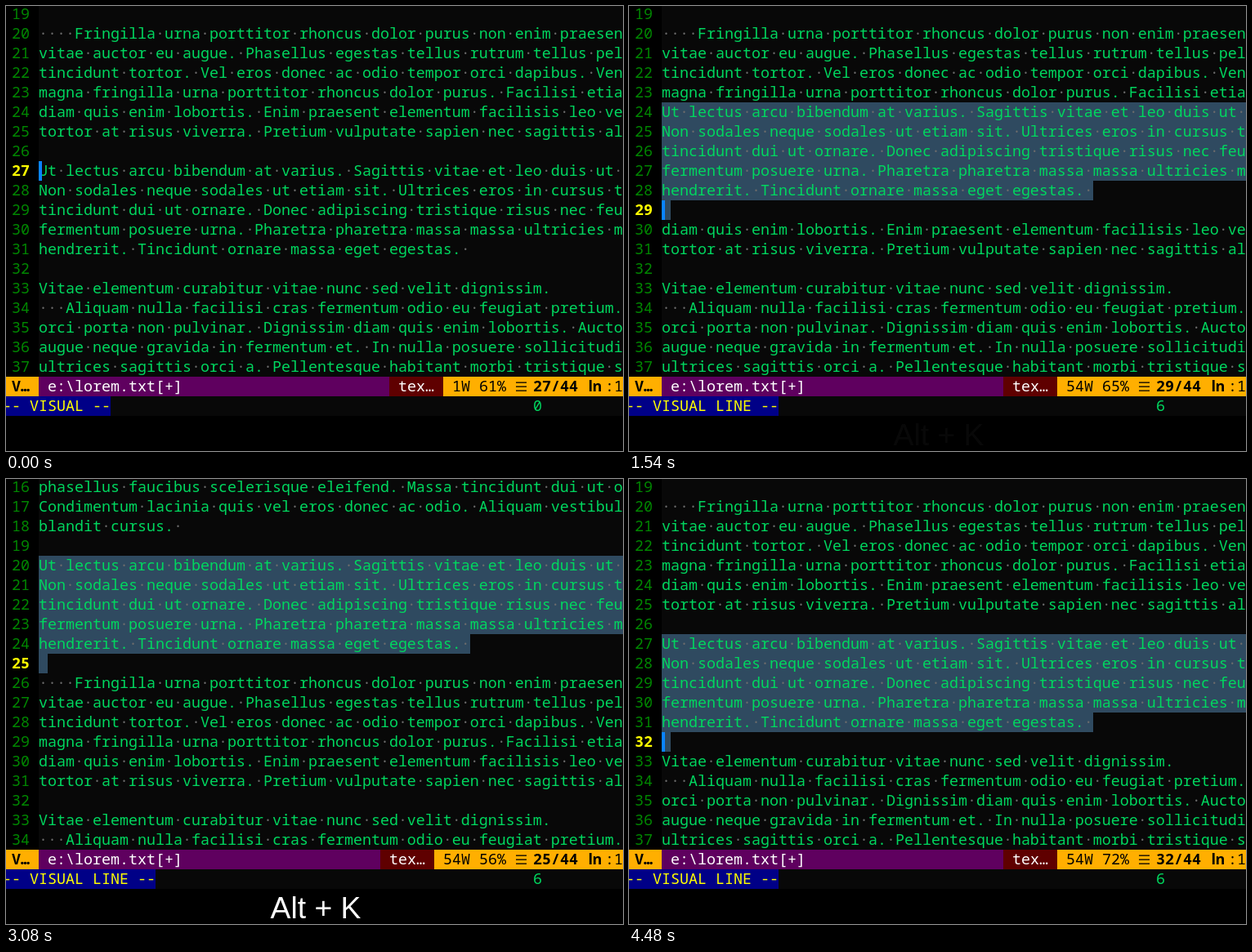
These frames come from a looping animation (755 by 545 pixels, 4.54 s). An HTML page:

```html
<!DOCTYPE html>
<html lang="en">
<head>
<meta charset="utf-8">
<title>Moving a block of lines</title>
<style>
html, body { margin: 0; width: 100%; height: 100%; overflow: hidden; background: #000; }
svg { display: block; width: 755px; height: 545px; }
text { font: 18.3333px "Noto Sans Mono", monospace; white-space: pre; }
.bold { font-weight: 700; }
.key { font: 37.3px "Liberation Sans", Arial, sans-serif; text-anchor: middle; }
.ln { font: 700 18px "Noto Sans", sans-serif; letter-spacing: -0.5px; }
</style>
</head>
<body>
<svg id="stage" viewBox="0 0 755 545"></svg>
<script>
const LOOP = 4540, CELL = 11, ROW = 24, ROWS = 19, LEFT = 40;
const FIRST = 15, TOTAL = 44, BLOCK = 27, SIZE = 6;

const lines = `Proin sagittis nisl rhoncus mattis rhoncus urna. Egestas egestas fringilla
phasellus faucibus scelerisque eleifend. Massa tincidunt dui ut ornare
Condimentum lacinia quis vel eros donec ac odio. Aliquam vestibulum
blandit cursus.\x20

    Fringilla urna porttitor rhoncus dolor purus non enim praesent
vitae auctor eu augue. Phasellus egestas tellus rutrum tellus pellentesque
tincidunt tortor. Vel eros donec ac odio tempor orci dapibus. Venenatis
magna fringilla urna porttitor rhoncus dolor purus. Facilisi etiam
diam quis enim lobortis. Enim praesent elementum facilisis leo vel
tortor at risus viverra. Pretium vulputate sapien nec sagittis aliquam

Ut lectus arcu bibendum at varius. Sagittis vitae et leo duis ut diam quam.
Non sodales neque sodales ut etiam sit. Ultrices eros in cursus turpis massa
tincidunt dui ut ornare. Donec adipiscing tristique risus nec feugiat in
fermentum posuere urna. Pharetra pharetra massa massa ultricies mi quis
hendrerit. Tincidunt ornare massa eget egestas.\x20

Vitae elementum curabitur vitae nunc sed velit dignissim.
   Aliquam nulla facilisi cras fermentum odio eu feugiat pretium.
orci porta non pulvinar. Dignissim diam quis enim lobortis. Auctor
augue neque gravida in fermentum et. In nulla posuere sollicitudin
ultrices sagittis orci a. Pellentesque habitant morbi tristique senectus`.split("\n");

const block = lines.slice(BLOCK - FIRST, BLOCK - FIRST + SIZE);
const rest = lines.filter((_, i) => i < BLOCK - FIRST || i >= BLOCK - FIRST + SIZE);
const words = s => s.split(/\s+/).filter(Boolean).length;

// [time, cursor line] while selecting, then [time, first line of the block]
const selects = [[80, 28], [280, 29], [480, 30], [680, 31], [800, 32]];
const moves = [[1140, 26], [1340, 25], [1540, 24], [1740, 23], [1940, 22], [2200, 21], [2340, 20],
  [3160, 19], [3280, 20], [3420, 21], [3560, 22], [3680, 23], [3880, 24], [4080, 25], [4280, 26], [4480, 27]];

const stage = document.getElementById("stage");
function add(tag, attrs, text = "") {
  const el = document.createElementNS("http://www.w3.org/2000/svg", tag);
  for (const k in attrs) el.setAttribute(k, attrs[k]);
  el.textContent = text;
  return stage.appendChild(el);
}
const rect = (x, y, width, height, fill) => add("rect", { x, y, width, height, fill });
const label = (x, y, fill, text, cls = "") => add("text", { x, y, fill, class: cls }, text);
const set = (el, k, v) => el.setAttribute(k, v);
const put = (el, s) => { if (el.textContent !== s) el.textContent = s; };
const show = (el, on) => set(el, "visibility", on ? "visible" : "hidden");

rect(LEFT, 0, 715, 454, "#080808");
rect(0, 478, 755, ROW, "#080808");
const rows = Array.from({ length: ROWS }, (_, i) => {
  const y = i * ROW + 16;
  return {
    sel: rect(LEFT, y - 18, 0, ROW, "#2f4a60"),
    num: label(7, y, "#008700", ""),
    dots: label(LEFT, y, "#6c6c6c", ""),
    text: label(LEFT, y, "#00d75f", "")
  };
});
const cursor = rect(LEFT, 0, 4, ROW, "#0a84ff");

// Status line
rect(0, 454, LEFT, ROW, "#ffaf00");
label(7, 472, "#000", "V…", "bold");
rect(LEFT, 454, 715, ROW, "#5f005f");
label(51, 472, "#fff", "e:\\lorem.txt[+]");
const typeBox = rect(0, 454, 66, ROW, "#5f0000");
const typeText = label(0, 472, "#fff", "tex…");
const infoBox = rect(0, 454, 240, ROW, "#ffaf00");
const infoText = label(0, 472, "#000", "");
for (const y of [460.5, 465.5, 470.5]) rect(624, y, 13, 1.3, "#000");
const position = label(645, 472, "#000", "", "bold");
label(712.5, 472, "#000", "ln", "ln");
label(733, 472, "#000", ":1");

// Command line
const modeBox = rect(-4, 478, 0, ROW, "#000087");
const modeText = label(-4, 496, "#ffff00", "");
const count = label(645, 496, "#00d75f", "");
const keys = label(379, 538, "#fff", "", "key");

function editorAt(t) {
  let cur = BLOCK, start = BLOCK, top = 19, linewise = false;
  for (const [at, line] of selects) if (t >= at) cur = line;
  for (const [at, line] of moves) if (t >= at) {
    linewise = true;
    start = line;
    cur = start + SIZE - 1;
    top = Math.min(Math.max(top, start - 8), start - 4);
  }
  return { cur, start, top, linewise };
}

const ramp = (t, a, b) => Math.min(1, Math.max(0, (t - a) / (b - a)));
function overlayAt(t) {
  if (t < 3460) return ["Alt + K", ramp(t, 1140, 2760) ** 2.5 * (1 - ramp(t, 3080, 3460))];
  return ["Alt + J", ramp(t, 3460, 4020) * (1 - ramp(t, 4020, 4480))];
}

function draw(t) {
  const { cur, start, top, linewise } = editorAt(t);
  const before = start - FIRST;
  const doc = [...rest.slice(0, before), ...block, ...rest.slice(before)];
  const last = linewise ? cur : cur - 1;

  rows.forEach((r, i) => {
    const n = top + i, s = doc[n - FIRST], active = n === cur;
    put(r.num, String(n));
    set(r.num, "fill", active ? "#ffff00" : "#008700");
    set(r.num, "class", active ? "bold" : "");
    put(r.text, s);
    put(r.dots, s.replace(/\S/g, "\0").replace(/ /g, "·").replace(/\0/g, " "));
    const on = n >= start && n <= last;
    set(r.sel, "width", on ? Math.max(1, s.length) * CELL : 0);
  });
  set(cursor, "y", (cur - top) * ROW - 2);
  show(cursor, t < 3080 || t >= 3160);

  const picked = words(block.slice(0, cur - start).join(" ")) + (words(block[cur - start]) ? 1 : 0);
  const info = `${picked}W ${Math.floor(cur / TOTAL * 100)}%`;
  const x = 612 - info.length * CELL;
  put(infoText, info);
  set(infoText, "x", x);
  set(infoBox, "x", x - 11);
  set(typeBox, "x", x - 77);
  set(typeText, "x", x - 66);
  put(position, `${cur}/${TOTAL}`);

  const mode = linewise ? "-- VISUAL LINE --" : "-- VISUAL --";
  const modeOn = t < 2200 || t >= 2260;
  put(modeText, mode);
  set(modeBox, "width", mode.length * CELL);
  show(modeText, modeOn);
  show(modeBox, modeOn);
  put(count, String(cur === start ? 0 : cur - start + 1));

  const [name, alpha] = overlayAt(t);
  put(keys, name);
  set(keys, "opacity", alpha.toFixed(3));
}

const began = performance.now();
function tick() {
  draw((performance.now() - began) % LOOP);
  requestAnimationFrame(tick);
}
tick();
</script>
</body>
</html>
```
